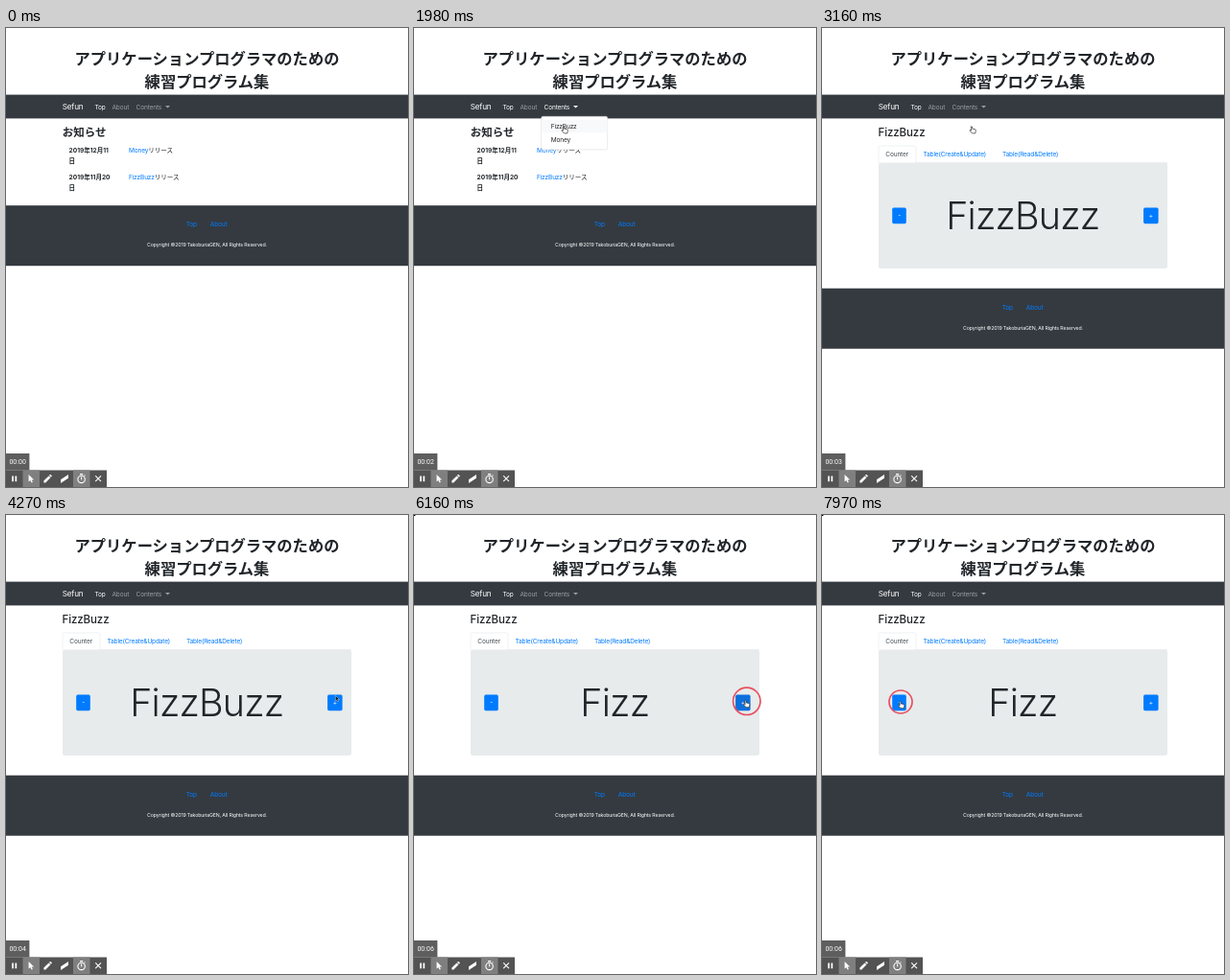
Recreate the animation shown at these times as an HTML page. Size 419 by 479 pixels, loop 8 s.

```html
<!DOCTYPE html>
<html lang="ja">
<head>
<meta charset="utf-8">
<title>FizzBuzz demo</title>
<style>
  html, body { margin: 0; width: 100%; height: 100%; overflow: hidden; background: #fff; }
  svg { display: block; width: 419px; height: 479px; }
  text {
    font: 400 6.55px Inter, "Noto Sans CJK JP", sans-serif;
    letter-spacing: -.025em; fill: #212529; white-space: pre;
  }
  .title { font-size: 16.3px; font-weight: 600; letter-spacing: 0; text-anchor: middle; }
  .head { font-size: 11.5px; font-weight: 500; letter-spacing: -.01em; }
  .ja { letter-spacing: 0; }
  .bold { font-weight: 700; letter-spacing: 0; }
  .brand { font-size: 8.2px; fill: #fff; }
  .white { fill: #fff; }
  .dim { fill: #999da0; }
  .link { fill: #007bff; }
  .mid { text-anchor: middle; }
  .small { font-size: 5.24px; }
  .big { font-size: 39.4px; font-weight: 300; letter-spacing: -.02em; text-anchor: middle; }
  .clock { font: 400 7px Roboto, sans-serif; letter-spacing: 0; fill: #fff; }
  .bar { fill: #343a40; }
  .btn { fill: #007bff; }
  .icon { fill: #fff; }
  .line { fill: none; stroke: #fff; stroke-width: 1.1; }
</style>
</head>
<body>
<svg viewBox="0 0 419 479">
  <rect width="419" height="479" fill="#fff"/>
  <text class="title" x="209.5" y="38">アプリケーションプログラマのための</text>
  <text class="title" x="209.5" y="62.3">練習プログラム集</text>

  <rect class="bar" y="69.6" width="419" height="24.8"/>
  <text class="brand" x="58.7" y="85.1">Sefun</text>
  <text class="white" x="92.4" y="84.7">Top</text>
  <text class="dim" x="110.5" y="84.7">About</text>
  <g id="contents" fill="#999da0">
    <text x="135.6" y="84.7" style="fill:inherit">Contents</text>
    <path d="M166 81h5l-2.5 2.5z"/>
  </g>

  <g id="news">
    <text class="head ja" x="58.7" y="112.7" style="font-weight:600">お知らせ</text>
    <text class="bold" x="65.6" y="130.3">2019年12月11</text>
    <text class="bold" x="65.6" y="140.7">日</text>
    <text x="128" y="130.3"><tspan class="link">Money</tspan><tspan class="ja">リリース</tspan></text>
    <text class="bold" x="65.6" y="158.3">2019年11月20</text>
    <text class="bold" x="65.6" y="168.7">日</text>
    <text x="128" y="158.3"><tspan class="link">FizzBuzz</tspan><tspan class="ja">リリース</tspan></text>
  </g>

  <g id="game">
    <text class="head" x="58.5" y="112.8">FizzBuzz</text>
    <path d="M59 140.5H360" stroke="#dee2e6" stroke-width=".5"/>
    <path d="M59 141V124.6q0-1.6 1.6-1.6H96.4q1.6 0 1.6 1.6V141" fill="#fff" stroke="#dee2e6" stroke-width=".5"/>
    <text x="66.3" y="134.3" style="fill:#495057">Counter</text>
    <text class="link" x="105.5" y="134.3">Table(Create&amp;Update)</text>
    <text class="link" x="187.9" y="134.3">Table(Read&amp;Delete)</text>
    <rect x="59" y="140.6" width="301" height="110.4" rx="2.2" fill="#e7ebec"/>
    <text class="big" id="count" x="209.3" y="210"></text>
    <rect class="btn" x="73.2" y="187.6" width="14.6" height="16.6" rx="1.6"/>
    <text class="white mid" x="80.6" y="198.3">-</text>
    <rect class="btn" id="plus" x="335.1" y="187.6" width="15.5" height="16.6" rx="1.6"/>
    <text class="white mid" x="342.8" y="198.3">+</text>
  </g>

  <g id="footer">
    <rect class="bar" y="185.2" width="419" height="63"/>
    <text class="link" x="187.8" y="207.2">Top</text>
    <text class="link" x="212.8" y="207.2">About</text>
    <text class="white small mid" x="209.5" y="228.2">Copyright ©2019 TakoburiaGEN, All Rights Reserved.</text>
  </g>

  <g id="menu">
    <rect x="132.7" y="92.3" width="69" height="34.6" rx="1.6" fill="#fff" stroke="#d4d5d6" stroke-width=".5"/>
    <rect id="row" x="133" y="96" width="68.4" height="13.2"/>
    <text id="item" x="142.8" y="105">FizzBuzz</text>
    <text x="142.8" y="119">Money</text>
  </g>

  <rect id="dot" width="1.4" height="1" fill="#000"/>

  <rect y="444" width="24.4" height="17.6" fill="#5e5e5e"/>
  <text class="clock" id="clock" x="3.4" y="455.2"></text>
  <rect y="461.5" width="105" height="17.5" fill="#535353"/>
  <path d="M17.5 461.5h17.5v17.5h-17.5zM70 461.5h17.5v17.5h-17.5z" fill="#7f7f7f"/>
  <path class="icon" d="M6.2 467.4h1.7v5.8h-1.7zM9.5 467.4h1.7v5.8h-1.7z"/>
  <path class="icon" d="M23.6 466v7.4l1.8-1.5 1.2 2.6 1.3-.6-1.2-2.5h2.4z"/>
  <path class="icon" d="M39.4 474.4v-1.9l5.1-5.1 1.9 1.9-5.1 5.1zM45 466.9l.8-.8q.4-.3.8 0l1.1 1.1q.3.4 0 .8l-.8.8z"/>
  <path class="icon" d="M57 471.2l8-5.2v3.8l-8 5.2z"/>
  <circle class="line" cx="78.6" cy="470.9" r="3.7"/>
  <path class="line" d="M77 465.6h3.2M78.6 468.6v2.6M81.6 467.4l.8-.8"/>
  <path class="line" d="M93.2 467.4l5.8 5.8M99 467.4l-5.8 5.8"/>

  <circle id="ring" fill="none" stroke="#e8505f" stroke-width="1.7"/>
  <path id="arrow" d="M.4.4v5.6l1.3-1.1.9 2 1-.4-.9-2h1.7z" fill="#111" stroke="#fff" stroke-width=".4"/>
  <path id="hand" d="M2.2.9q.7-.7 1.2.1l.4 2.2 2.4.4q1.2.2 1.1 1.4l-.5 2.9H3.4L1 5.1q0-1 1-.6l.6.5z"
    fill="#fff" stroke="#222" stroke-width=".65" stroke-linejoin="round"/>
</svg>
<script>
const LOOP = 8000;
const el = id => document.getElementById(id);
const show = (id, on) => { el(id).style.display = on ? '' : 'none'; };

// Value of the last [time, value...] entry that has begun.
const at = (track, t) => track.filter(s => s[0] <= t).pop();

const seconds = [[0, 0], [1030, 1], [1980, 2], [2980, 3], [4070, 4], [5050, 5], [5900, 6], [7130, 7], [7260, 6]];
const counts = [[0, 0], [4660, 1], [5050, 2], [5440, 3], [6290, 4], [6720, 5], [7710, 4], [7970, 3]];
const navColor = [[0, '#999da0'], [540, '#ccced0'], [900, '#fff'], [3160, '#999da0']];
const rowColor = [[0, '#fff'], [1680, '#f8f9fa'], [2980, '#007bff']];
const plusColor = [[0, '#007bff'], [4410, '#0c70dc'], [7260, '#007bff']];

const cursor = [
  [0], [100, 'arrow', 304, 134], [190, 'arrow', 183, 115], [330, 'arrow', 182.4, 114.4],
  [540, 'hand', 152.4, 82], [1430, 'hand', 152.6, 89], [1560, 'hand', 152.8, 97], [1680, 'hand', 153, 102],
  [3310], [3730, 'arrow', 123, 118], [3910, 'arrow', 198, 180], [4070, 'arrow', 271.5, 184.5],
  [4270, 'arrow', 343, 188], [4410, 'hand', 342.6, 192.8], [7130, 'arrow', 135, 191],
  [7260, 'arrow', 98, 193.4], [7410, 'arrow', 87.4, 193.2], [7580, 'hand', 78.6, 193.8]
];

const PLUS = [346.8, 194.3, 14.2], MINUS = [82, 195, 12];
const clicks = [
  [720, 1030, 155, 83.2, 14.2], [2980, 3160, 155.5, 103.3, 14.2],
  ...[4530, 4920, 5310, 6160, 6590].map(t => [t, t + 260, ...PLUS]),
  [7580, 7710, ...MINUS], [7840, LOOP, ...MINUS]
];

const fizz = n => (n % 3 ? '' : 'Fizz') + (n % 5 ? '' : 'Buzz') || String(n);

function draw(t) {
  const game = t >= 3160;
  show('news', !game);
  show('game', game);
  show('menu', t >= 900 && !game);
  show('dot', t >= 5310);
  el('footer').setAttribute('transform', `translate(0 ${game ? 86.5 : 0})`);

  el('clock').textContent = '00:0' + at(seconds, t)[1];
  el('count').textContent = fizz(at(counts, t)[1]);
  el('contents').style.fill = at(navColor, t)[1];
  el('row').style.fill = at(rowColor, t)[1];
  el('item').style.fill = t >= 2980 ? '#fff' : '#212529';
  el('plus').style.fill = at(plusColor, t)[1];

  const [, kind, x, y] = at(cursor, t);
  for (const id of ['arrow', 'hand']) {
    show(id, id === kind);
    if (id === kind) el(id).setAttribute('transform', `translate(${x} ${y})`);
  }

  const click = clicks.find(c => c[0] <= t && t < c[1]);
  show('ring', click);
  if (click) ['cx', 'cy', 'r'].forEach((key, i) => el('ring').setAttribute(key, click[i + 2]));
}

const start = performance.now();
function tick() {
  draw((performance.now() - start) % LOOP);
  requestAnimationFrame(tick);
}
tick();
</script>
</body>
</html>
```
